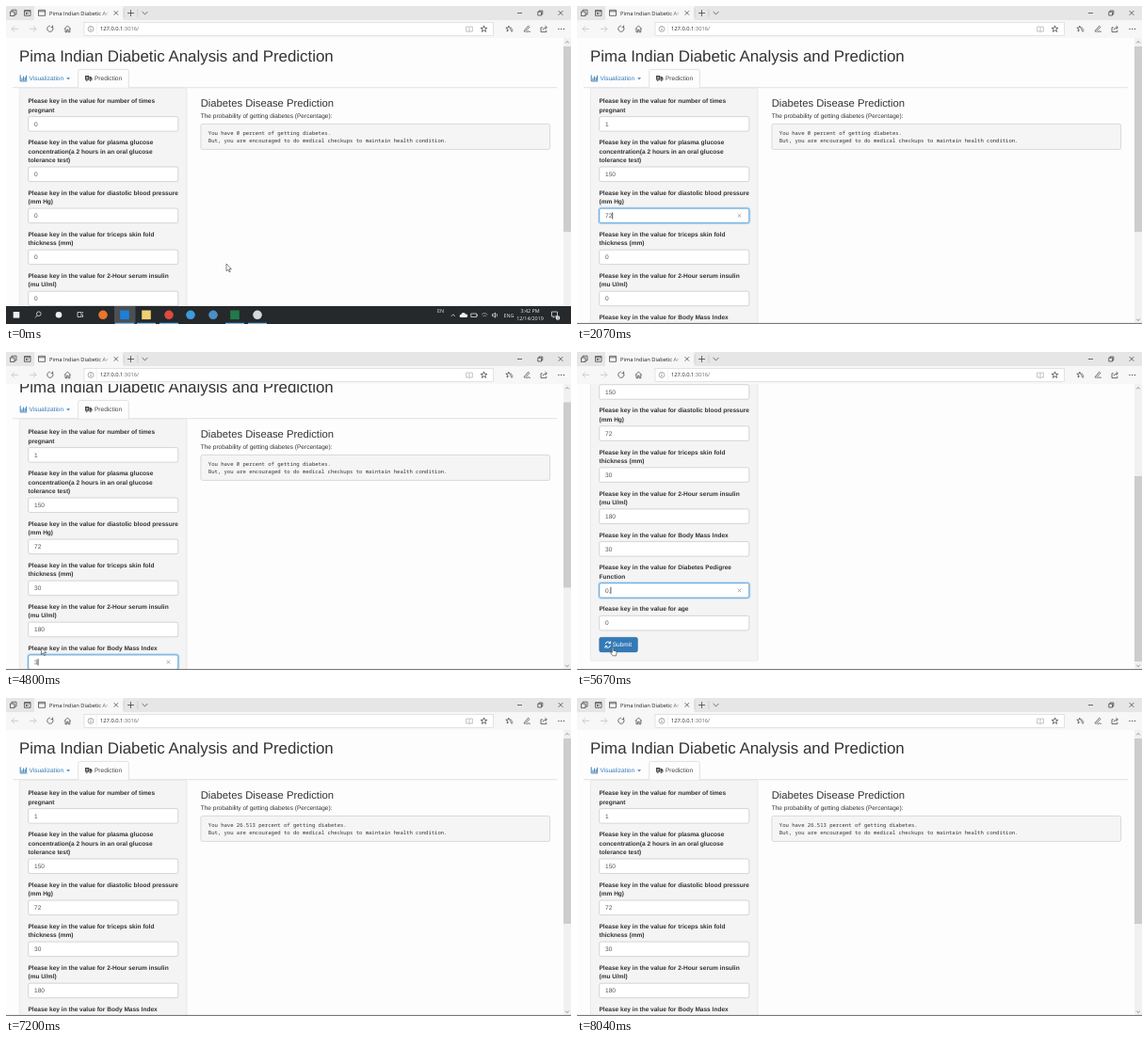
An HTML page that plays this animation: 600 by 338 pixels, repeating every 8.1 s.

```html
<!DOCTYPE html>
<html lang="en">
<head>
<meta charset="utf-8">
<title>Diabetes prediction form</title>
<style>
html, body { margin: 0; width: 100%; height: 100%; overflow: hidden; background: #fdfdfe; }
svg { display: block; width: 600px; height: 338px; text-rendering: geometricPrecision; }
text { font: 6.5625px "Liberation Sans", Arial, sans-serif; fill: #333; white-space: pre; }
.b { font-weight: bold; }
.ui { font: 5.75px "Open Sans", "Noto Sans", sans-serif; fill: #222; }
.mono { font: 5.57px "Noto Sans Mono", "DejaVu Sans Mono", monospace; }
.tray text { font: 5.4px "Open Sans", "Noto Sans", sans-serif; fill: #eee; text-anchor: middle; }
.line { fill: none; stroke: #333; stroke-width: .7; }
.value { fill: #555; }
</style>
</head>
<body>
<svg viewBox="0 0 600 338">
  <defs>
    <linearGradient id="fade"><stop offset="0" stop-color="#f7f7f7" stop-opacity="0"/><stop offset="1" stop-color="#f7f7f7"/></linearGradient>
  </defs>
  <rect width="600" height="338" fill="#fdfdfe"/>

  <g id="page">
    <text x="14.1" y="59.1" style="font-size:16.875px">Pima Indian Diabetic Analysis and Prediction</text>
    <path d="M7 86.7H76.7V69.3q0-1.9 1.9-1.9h49.8q1.9 0 1.9 1.9V86.7H585" fill="none" stroke="#d6d6d6" stroke-width=".7"/>
    <path d="M15.2 73.4V79.9H22.3M17 79V76.6M18.6 79V74.6M20.2 79V75.8M21.6 79V73.8" fill="none" stroke="#337ab7" stroke-width=".95"/>
    <text x="24.5" y="79.4" style="fill:#337ab7">Visualization</text>
    <path d="M64.2 76.2h3.8l-1.9 2z" fill="#337ab7"/>
    <path d="M84 74h4.3v4.7H84zM88.7 75.1h1.5l1.3 1.7v1.9h-2.8z" fill="#444"/>
    <g fill="#444" stroke="#fdfdfe" stroke-width=".4"><circle cx="85.8" cy="79" r="1.15"/><circle cx="89.7" cy="79" r="1.15"/></g>
    <path d="M85 76.2h2.2M86.1 75.1v2.2" stroke="#fff" stroke-width=".6"/>
    <text x="94" y="79.4" style="fill:#444">Prediction</text>

    <rect x="14.3" y="87.2" width="177.8" height="277.2" rx="1.9" fill="#f4f4f4" stroke="#e0e0e0" stroke-width=".6" id="well"/>
    <g id="form"></g>
    <rect id="submit" x="23.7" y="439.6" width="40.7" height="15.6" rx="1.9" stroke="#2e6da4" stroke-width=".5"/>
    <path d="M30.2 446.7a2.7 2.7 0 0 1 4.8-1.4M35.4 448.1a2.7 2.7 0 0 1-4.8 1.4M35.6 443.8v2.2h-2.2M30 451v-2.2h2.2" fill="none" stroke="#fff" stroke-width="1"/>
    <text x="37.7" y="449.6" style="fill:#fff">Submit</text>

    <text x="206.7" y="106.5" style="font-size:11.25px">Diabetes Disease Prediction</text>
    <text x="206.7" y="119.4">The probability of getting diabetes (Percentage):</text>
    <rect x="206.9" y="125.4" width="370.7" height="27" rx="1.9" fill="#f5f5f5" stroke="#ccc" stroke-width=".7"/>
    <text class="mono" x="214.8" y="136.5" id="result"></text>
    <text class="mono" x="214.8" y="145.2">But, you are encouraged to do medical checkups to maintain health condition.</text>
  </g>

  <rect x="592" y="34" width="8" height="304" fill="#f1f1f1"/>
  <rect id="thumb" x="592" width="8" fill="#cdcdcd"/>
  <path class="line" d="M594.2 39.4l1.8-1.9 1.8 1.9M594.2 332.6l1.8 1.9 1.8-1.9" style="stroke:#666"/>

  <g id="chrome">
    <rect width="600" height="15.5" fill="#e6e6e6"/>
    <rect y="15" width="600" height="19" fill="#f7f7f7"/>
    <rect x="30" width="94.5" height="16" fill="#f7f7f7"/>
    <path class="line" d="M4.5 6h4.5v4.5H4.5zM6 6V4.2h5V9H9M19.5 4.5h6.5v5.8h-6.5zM19.5 5.8h6.5M24 8h-3l1-1m-1 1l1 1"/>
    <path class="line" d="M34.5 4.3h7v6h-7zM34.5 5.8h7"/>
    <text class="ui" x="46" y="9.6">Pima Indian Diabetic Ar</text>
    <rect x="101" y="2" width="10" height="11" fill="url(#fade)"/>
    <path class="line" d="M114.6 5.2l4.4 4.4m0-4.4l-4.4 4.4M129 7.5h7M132.5 4v7M144.6 6l2.9 2.9L150.4 6"/>
    <path d="M125 2.5v10M139.8 3v9" stroke="#bbb" stroke-width=".5"/>
    <path class="line" d="M543 7.5h5M564.8 6.2h3.8V10h-3.8zM566 6.2V5h3.8v3.8h-1.2M586.6 5l4.8 4.8m0-4.8l-4.8 4.8"/>
    <path class="line" d="M13 24.3H6m3-3l-3 3 3 3M25 24.3h7m-3-3l3 3-3 3" style="stroke:#bbb"/>
    <path class="line" d="M49.4 22.4a3.1 3.1 0 1 1-2.6-1.3M49.6 20.6v2h-2M62 24.4l3.4-3.4 3.4 3.4M63 23.6v4.2h1.7v-2.6h1.4v2.6h1.7v-4.2"/>
    <rect x="83" y="17.4" width="434.5" height="13.8" fill="#fff" stroke="#c9c9c9" stroke-width=".5"/>
    <circle class="line" cx="90" cy="24.4" r="2.9" style="stroke:#555;stroke-width:.5"/>
    <path class="line" d="M90 23.8v2.2M90 22.4v.7" style="stroke:#555;stroke-width:.6"/>
    <path d="M96.4 18.5v11.6" stroke="#ddd" stroke-width=".4"/>
    <text class="ui" x="100" y="26.4">127.0.0.1<tspan fill="#666">:3016/</tspan></text>
    <path class="line" d="M492 22.5v5M492 22.5q-1.5-1-3.3-.4v5q1.8-.6 3.3.4 1.5-1 3.3-.4v-5q-1.8-.6-3.3.4" style="stroke:#aaa"/>
    <path class="line" d="M507.500 20.900l.9 2.400h2.500l-2 1.600.7 2.500-2.100-1.500-2.100 1.500.7-2.500-2-1.600h2.500z"/>
    <path class="line" d="M533.8 21.200l.8 2h2.300M533.800 21.200l-.8 2h-2.200l1.800 1.500-.6 2.300 1.800-1.300M535 25h3.300M536 26.800h2.300"/>
    <path class="line" d="M550 26.600l4.600-5.400 1.300 1.200-4.700 5zM552.500 27.800q2-1.600 4.300-.4"/>
    <path class="line" d="M569.700 22.800h-1.700v4.800h5.800v-1.900M570 25.500q.4-2.700 4.200-2.700m-1.700-1.800l1.900 1.800-1.900 1.800"/>
    <g fill="#333"><circle cx="587" cy="24.4" r=".6"/><circle cx="589.7" cy="24.4" r=".6"/><circle cx="592.4" cy="24.4" r=".6"/></g>
  </g>

  <rect y="336.9" width="600" height="1.1" fill="#777"/>
  <g id="taskbar" class="tray">
    <rect y="319" width="600" height="19" fill="#25292c"/>
    <rect x="115" y="319" width="22.500" height="19" fill="#4b5054"/>
    <g id="apps"></g>
    <g fill="none" stroke="#eee" stroke-width=".75">
      <circle cx="34.800" cy="327.200" r="2.300"/><path d="M33.200 329l-2.300 2.400"/>
      <path d="M76 325.500h4v5h-4zM81.500 325v1.500M81.500 328v3"/>
      <path d="M472.800 329.800l2-2 2 2M493.800 327h6v3.500h-6zM500.500 328v1.500"/>
      <path d="M505 328.200q3-3.600 6.500 0M506.400 329.900q1.900-2.200 3.700 0" stroke="#aaa"/>
      <path d="M516.500 327.600h1.300l1.700-1.500v5l-1.700-1.500h-1.300zM521 327q1 1.600 0 3.200"/>
      <path d="M579.500 325h6v4.800h-2.700l-1.500 1.500v-1.500h-1.800z"/>
    </g>
    <path d="M482.800 331a1.700 1.700 0 0 1 .5-3.300 2.600 2.600 0 0 1 4.700-.2 1.800 1.800 0 0 1 .9 3.500z" fill="#eee"/>
    <text x="461.500" y="326">EN</text>
    <text x="534" y="330.600">ENG</text>
    <text x="556.500" y="326.300">3:42 PM</text>
    <text x="556.500" y="334.300">12/14/2019</text>
    <circle cx="586" cy="331.500" r="2.200" fill="#eee"/>
    <text x="586" y="333" style="font-size:3.800px;fill:#222">3</text>
  </g>

  <path id="arrow" d="M0 0V7.600L1.800 6 3 8.800 4.200 8.300 3 5.600H5.400Z" fill="#fff" stroke="#333" stroke-width=".6"/>
  <path id="hand" d="M0 0q.9-.5 1.200.4V3.400l2.600.6q.9.300.8 1.300L4 8.800H.4L-2 5.600q.3-1 1.500-.2L-.200 5.600V.400z" fill="#fff" stroke="#333" stroke-width=".6"/>
</svg>
<script>
const LOOP = 8100, VIEW_TOP = 34, MAX_SCROLL = 136.3;
const LINE = 9.375, BOX = 15.94;
const $ = id => document.getElementById(id);
const clamp = x => Math.min(1, Math.max(0, x));
const ease = x => x * x * (3 - 2 * x);

// Interpolates [time, ...values] stops with easing between neighbours.
function track(stops, t) {
  const i = stops.findIndex(s => s[0] > t);
  if (i === 0) return stops[0].slice(1);
  if (i < 0) return stops.at(-1).slice(1);
  const a = stops[i - 1], b = stops[i], k = ease((t - a[0]) / (b[0] - a[0]));
  return a.slice(1).map((v, j) => v + (b[j + 1] - v) * k);
}

const labels = [
  "number of times|pregnant",
  "plasma glucose|concentration(a 2 hours in an oral glucose|tolerance test)",
  "diastolic blood pressure|(mm Hg)",
  "triceps skin fold|thickness (mm)",
  "2-Hour serum insulin|(mu U/ml)",
  "Body Mass Index",
  "Diabetes Pedigree|Function",
  "age"
];
// The last entry is the moment the submit button takes the focus.
const focusAt = [510, 1080, 1650, 2250, 3090, 3420, 4950, 6060, 6750];
const keys = [
  [840, 0, "1"],
  [1350, 1, "1"], [1410, 1, "15"], [1500, 1, "150"],
  [1920, 2, "7"], [2010, 2, "72"],
  [2640, 3, "3"], [2730, 3, "30"],
  [3210, 4, "1"], [3270, 4, "18"], [3330, 4, "180"],
  [4800, 5, "3"], [4860, 5, "30"],
  [5670, 6, "0."], [5760, 6, "0.6"],
  [6570, 7, "3"], [6630, 7, "30"]
];
const scrollStops = [
  [3420, 0], [3570, 16], [4890, 16], [5100, MAX_SCROLL],
  [6840, MAX_SCROLL], [7200, 0], [7320, -7.6], [7380, -7.6], [7680, 0]
];
const pointerStops = [
  [40, 234, 274], [450, 60, 122], [3660, 60, 122], [4140, 37.5, 314]
];

let y = 96.3;
$("form").innerHTML = labels.map(label => {
  const lines = ("Please key in the value for " + label).split("|");
  const text = lines.map((s, i) => `<text class="b" x="23.500" y="${y + i * LINE + 7}">${s}</text>`).join("");
  const top = y + lines.length * LINE + 2.34;
  const mid = top + BOX / 2;
  const rect = `x="23.700" y="${top + .2}" width="159.100" height="${BOX - .4}" rx="1.900"`;
  y = top + BOX + 7.03;
  return `${text}<g class="field">
    <rect class="glow" ${rect} fill="none" stroke="#66afe9" stroke-width="3.400" stroke-opacity=".3"/>
    <rect ${rect} fill="#fff" stroke="#c4c4c4" stroke-width=".7"/>
    <rect class="glow" ${rect} fill="none" stroke="#55a5e6" stroke-width=".9"/>
    <text class="value" x="30" y="${mid + 2.3}"></text>
    <g class="edit"><path class="caret" d="M0 ${mid - 3.6}v7.200" stroke="#111" stroke-width=".7"/>
    <path d="M170.700 ${mid - 1.8}l3.600 3.600m0-3.600l-3.600 3.600" stroke="#777" stroke-width=".6"/></g></g>`;
}).join("");
$("well").setAttribute("height", 377.2);

const fields = [...document.querySelectorAll(".field")].map(g => ({
  glows: g.querySelectorAll(".glow"),
  value: g.querySelector(".value"),
  edit: g.querySelector(".edit"),
  caret: g.querySelector(".caret")
}));

// Taskbar apps: x, colour, shape, running
$("apps").innerHTML = [
  [11, "#eee", "s"], [56, "#eee", "c"], [103, "#e8762c", "c"], [126, "#1e7fd6", "s", 1],
  [149, "#f0cf70", "s", 1], [173, "#dc4b3e", "c", 1], [196, "#3d9bdc", "c"],
  [220, "#4b8fc4", "c"], [243, "#217a4b", "s", 1], [267, "#d8d8d8", "c", 1]
].map(([x, fill, shape, on]) => {
  const r = x < 60 ? 3.3 : 4.8;
  const mark = shape === "c"
    ? `<circle cx="${x}" cy="328.300" r="${r}" fill="${fill}"/>`
    : `<rect x="${x - r}" y="${328.3 - r}" width="${2 * r}" height="${2 * r}" fill="${fill}"/>`;
  return mark + (on ? `<rect x="${x - 10}" y="336.800" width="20" height="1.200" fill="#76b9ed"/>` : "");
}).join("");

function drawForm(t) {
  const values = labels.map(() => "0");
  for (const [at, i, text] of keys) if (t >= at) values[i] = text;
  fields.forEach((f, i) => {
    const [on, off] = [focusAt[i], focusAt[i + 1]];
    const glow = clamp((t - on) / 120) * (1 - clamp((t - off) / 120));
    f.glows.forEach(g => g.setAttribute("opacity", glow));
    f.value.textContent = values[i];
    f.edit.style.display = t >= on && t < off ? "" : "none";
    f.caret.setAttribute("transform", `translate(${30.4 + f.value.getComputedTextLength()})`);
  });
  $("submit").setAttribute("fill", t >= 6750 ? "#286090" : "#337ab7");
  $("result").textContent = `You have ${t >= 6960 ? "26.513" : "0"} percent of getting diabetes.`;
}

function drawPointer(t) {
  const [x, py] = track(pointerStops, t);
  const shown = t < 780 || (t >= 3660 && t < 6900);
  const onButton = t >= 5070;
  $("arrow").style.display = shown && !onButton ? "" : "none";
  $("hand").style.display = shown && onButton ? "" : "none";
  for (const id of ["arrow", "hand"]) $(id).setAttribute("transform", `translate(${x} ${py})`);
}

function draw(t) {
  const [scroll] = track(scrollStops, t);
  $("page").setAttribute("transform", `translate(0 ${-scroll})`);
  $("thumb").setAttribute("y", VIEW_TOP + 9 + Math.max(0, scroll) * 89 / MAX_SCROLL);
  $("thumb").setAttribute("height", 197 + Math.min(0, scroll) * .65);
  $("taskbar").setAttribute("transform", `translate(0 ${19 * ease(clamp((t - 60) / 180))})`);
  drawForm(t);
  drawPointer(t);
}

const start = performance.now();
function frame() {
  draw((performance.now() - start) % LOOP);
  requestAnimationFrame(frame);
}
frame();
</script>
</body>
</html>
```
